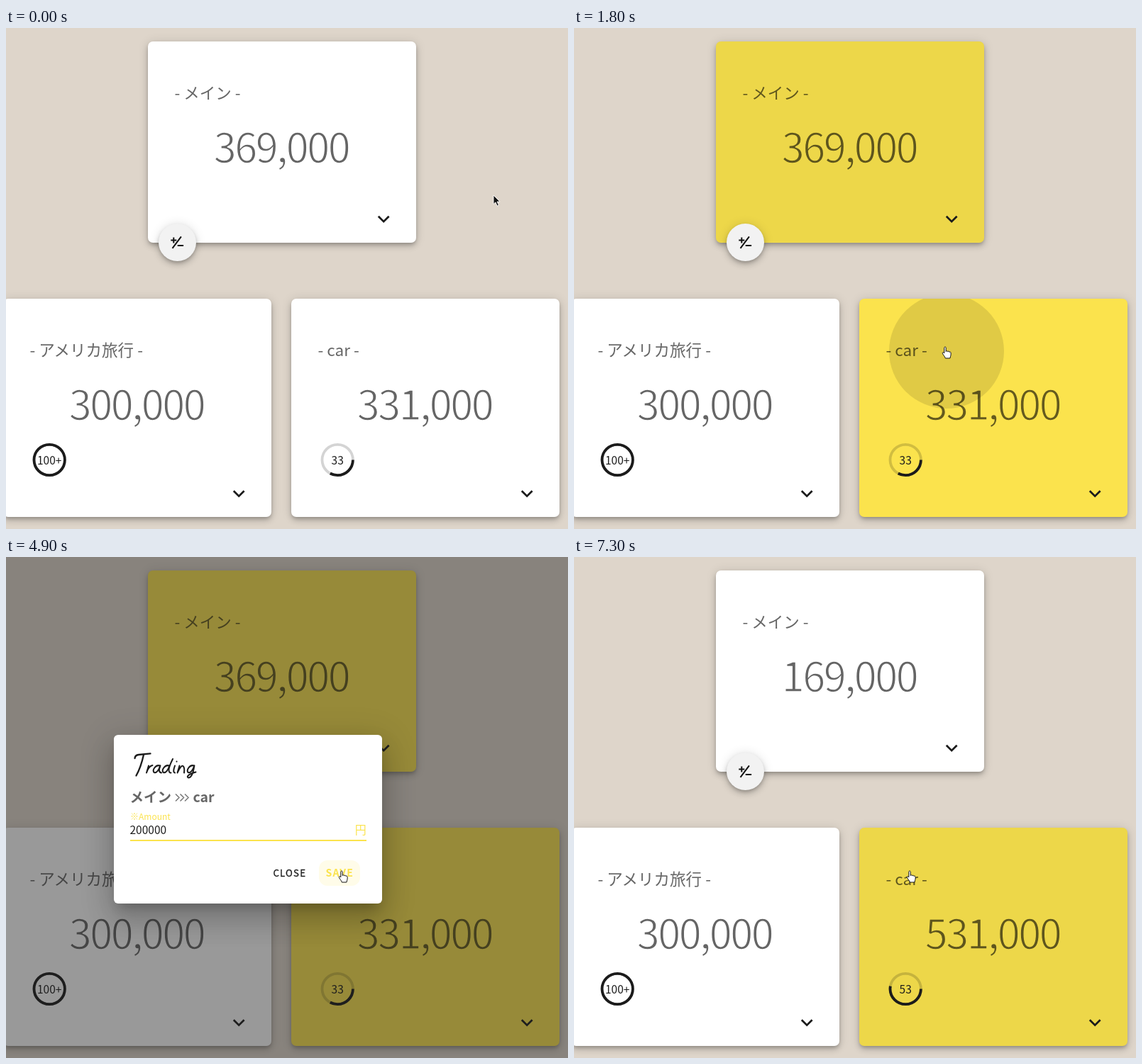
An HTML page that plays this animation: 792x707 px, repeating every 7400 ms.

```html
<!DOCTYPE html>
<html lang="ja">
<head>
<meta charset="utf-8">
<title>Trading</title>
<style>
  html, body { margin: 0; width: 100%; height: 100%; overflow: hidden; }
  body {
    position: relative; background: #ded5ca; color: #1b1b1b;
    font-family: "Noto Sans CJK JP", "Noto Sans JP", sans-serif;
  }
  .card, #fab, #shade, #dialog, #cursor { position: absolute; }
  .card { width: 378px; border-radius: 7px; overflow: hidden; }
  .card, #fab { box-shadow: 0 3px 5px -1px rgba(0,0,0,.2), 0 5px 9px rgba(0,0,0,.14), 0 1px 15px rgba(0,0,0,.12); }
  svg { display: block; width: 100%; height: 100%; }
  .name { font-size: 22.5px; fill: rgba(0,0,0,.6); }
  .sum { font-size: 57.5px; letter-spacing: -.042em; text-anchor: middle; fill: #fff; stroke: #000; stroke-width: 1.4px; }
  .pct { font-size: 15.5px; text-anchor: middle; fill: #1b1b1b; }
  #fab { left: 214.5px; top: 275.5px; width: 53px; height: 53px; border-radius: 50%; background: #f2f2f2; }
  #shade { inset: 0; background: #212121; }
  #dialog {
    left: 152px; top: 251px; width: 378px; height: 238px; border-radius: 6px; background: #fff;
    box-shadow: 0 11px 15px -7px rgba(0,0,0,.2), 0 24px 38px 3px rgba(0,0,0,.14), 0 9px 46px 8px rgba(0,0,0,.12);
  }
  .route { font-size: 19.5px; font-weight: 700; fill: #666; }
  .field { font-size: 16px; }
  .hint { font-size: 11.2px; }
  .btn { font-size: 13.2px; letter-spacing: 1.2px; stroke: #1b1b1b; stroke-width: .3px; fill: #1b1b1b; }
  .save { font-size: 14px; letter-spacing: 1.2px; font-weight: 700; }
  #cursor { left: 0; top: 0; width: 24px; height: 24px; overflow: visible; }
</style>
</head>
<body>
<div id="fab"><svg viewBox="214.5 275.5 53 53" fill="none" stroke="#111" stroke-width="2">
  <path d="M231.8 299h8M235.8 295v8M234 310.3L246.4 293.8M241.2 306.4h8.4"/>
</svg></div>
<div id="shade"></div>
<div id="dialog"><svg viewBox="152 251 378 238">
  <defs><path id="bowl" d="M9 0C3-2-2 6 .5 9.300C4 11.500 8 5 9.300 0"/></defs>
  <g fill="none" stroke="#1b1b1b" stroke-width="2" stroke-linecap="round" stroke-linejoin="round" role="img" aria-label="Trading">
    <path stroke-width="2.3" d="M181.500 284Q182 279.500 187 279T203.500 277.300M194 279Q190 297 183.500 308.500"/>
    <path d="M201 294.500L198 304.500Q201 295 206.500 294"/>
    <use href="#bowl" x="208" y="294.500"/><path d="M217.300 294.500Q214 304 219 304.500"/>
    <use href="#bowl" x="221" y="294.500"/><path d="M235 285Q229 297 229.500 301T232.500 304.500"/>
    <path d="M238 294.500Q234.500 304 238 304.500M240.500 288.500v.3"/>
    <path d="M244.500 294.500L241.500 304.500Q247 293 249.500 295T251 304.500"/>
    <use href="#bowl" x="256" y="294.500"/><path d="M265.300 294.500Q263 311.500 257 311.500C253.500 310 258 306 267.500 303.500"/>
  </g>
  <g class="route"><text class="ends" x="174.500" y="346">メイン</text><text class="ends" x="263.500" y="346">car</text></g>
  <path d="M239 334.500l5 5-5 5M245.500 334.500l5 5-5 5M252 334.500l5 5-5 5" fill="none" stroke="#777" stroke-width="1.500"/>
  <text id="label" class="field">※Amount</text>
  <text id="value" class="field" x="174.500" y="390.700" style="font-size:15.500px" fill="#1b1b1b"></text>
  <rect id="caret" y="376" width="1" height="19" fill="#fbe34d"/>
  <text id="unit" class="field" x="491.800" y="391">円</text>
  <rect id="line" x="175" width="333"/>
  <text id="hint" class="hint" x="175" y="417.600">必須項目です</text>
  <text class="btn" x="376.500" y="451">CLOSE</text>
  <rect id="halo" x="441" y="428" width="58" height="36" rx="12"/>
  <text id="save" class="save" x="450.500" y="451.200">SAVE</text>
</svg></div>
<svg id="cursor"></svg>

<script>
const LOOP = 7400, FRAME = 100, YELLOW = '#fbe34d', RED = '#c5421f';
const PICK_FROM = 1100, PICK_TO = 1800, FOCUS = 2700, TYPE = 3400, SAVE = 5300, PAID = 6000, PICK_NEXT = 6700;
const $ = id => document.getElementById(id);

const clamp = v => Math.min(1, Math.max(0, v));
const ramp = (t, start, length) => clamp((t - start) / length);
const easeOut = (t, start, length) => 1 - (1 - ramp(t, start, length)) ** 2.5;
const easeInOut = (t, start, length) => (1 - Math.cos(Math.PI * ramp(t, start, length))) / 2;
const within = (v, lo, hi) => v >= lo && v < hi;

function set(el, attrs) {
  for (const k in attrs) el.setAttribute(k, attrs[k]);
}

// The masked outline of the digits makes them thinner.
function makeCard(id, x, y, h, name, ring) {
  const el = document.createElement('div');
  el.className = 'card';
  el.style.cssText = `left:${x}px;top:${y}px;height:${h}px`;
  el.innerHTML = `<svg viewBox="0 0 378 ${h}">
    <rect class="tint" width="378" height="${h}"/>
    <circle class="ripple"/>
    <text class="name" x="37.400" y="81.300">${name}</text>
    <mask id="${id}"><text class="sum" x="188" y="170.800"></text></mask>
    <rect y="110" width="378" height="85" opacity=".6" mask="url(#${id})"/>
    ${ring ? `<g fill="none" stroke-width="3.800">
      <circle cx="65.200" cy="227.500" r="21.700" stroke="rgba(0,0,0,.17)"/>
      <circle class="arc" cx="65.200" cy="227.500" r="21.700" stroke="#1b1b1b" pathLength="100"/></g>
      <text class="pct" x="65.200" y="233.500"></text>` : ''}
    <path transform="translate(315.400 ${h - 49.8}) scale(1.400)" fill="#1b1b1b"
      d="M7.410 8.580L12 13.170l4.590-4.590L18 10l-6 6-6-6z"/>
  </svg>`;
  document.body.insertBefore(el, $('fab'));
  const part = c => el.querySelector('.' + c);
  const holds = (px, py) => within(px, x, x + 378) && within(py, y, y + h);
  return { el, x, y, holds, tint: part('tint'), ripple: part('ripple'), sum: part('sum'), arc: part('arc'), pct: part('pct') };
}

const main = makeCard('sumMain', 199.5, 19, 283.5, '- メイン -');
const trip = makeCard('sumTrip', -3.6, 382, 308, '- アメリカ旅行 -', true);
const car = makeCard('sumCar', 402, 382, 308, '- car -', true);
const cards = [main, trip, car];

// Each move eases the pointer from where it rests to a new place.
const MOVES = [
  { start: 400, length: 900, x: 459, y: 222 },
  { start: 1400, length: 300, x: 523, y: 450 },
  { start: 2200, length: 400, x: 300, y: 386 },
  { start: 4300, length: 600, x: 473, y: 443 }
];
const SHAPES = {
  arrow: '<path d="M0 0v12.500l2.900-2.600 2.300 5.200 2.200-1-2.300-5h3.900z" fill="#111" stroke="#fff" stroke-width=".9"/>',
  hand: `<path transform="translate(-4.200 0)" fill="#fff" stroke="#111" d="M3 1.500c0-2 2.400-2 2.400 0v5c.3-1.200 2.200-1
    2.400.3.500-1 2.200-.7 2.300.6.700-.7 2.200-.3 2.200 1v3c0 2-1.200 2.800-1.200 4.600H4.500C4 13.500 1.500 11.500.6 9.300c-.6-1.600 1-2.300 2.400-.4z"/>`,
  beam: '<path d="M-3-8q3 0 3 2.500Q0-8 3-8M0-6V6M-3 8q3 0 3-2.500Q0 8 3 8" fill="none" stroke="#111"/>',
  none: ''
};

function pointerAt(t) {
  const p = { x: 687, y: 236 };
  for (const m of MOVES) {
    const k = easeInOut(t, m.start, m.length);
    p.x += (m.x - p.x) * k;
    p.y += (m.y - p.y) * k;
  }
  return p;
}

function pointerShape(t, { x, y }) {
  if (within(t, TYPE, 4300)) return 'none';
  if (!within(t, 1900, SAVE + FRAME)) return cards.some(c => c.holds(x, y)) ? 'hand' : 'arrow';
  if (within(x, 175, 508) && within(y, 372, 402)) return 'beam';
  return within(x, 441, 499) && within(y, 428, 464) ? 'hand' : 'arrow';
}

function paint(card, t, { sum, yellow, hover, click = LOOP, share }) {
  const age = t - click, spot = pointerAt(click);
  card.el.style.background = yellow ? YELLOW : '#fff';
  card.sum.textContent = sum.toLocaleString('en-US');
  set(card.tint, { opacity: hover ? .055 : 0 });
  set(card.ripple, {
    cx: spot.x - card.x + 2, cy: spot.y - card.y + 6, r: 81 + 1.6 * Math.max(0, age),
    opacity: age < 0 ? 0 : (.11 + .105 * ramp(age, 0, 200)) * (1 - ramp(age, 200, 400))
  });
  if (share) {
    card.pct.textContent = share.text;
    set(card.arc, { 'stroke-dasharray': `${share.arc} ${100.01 - share.arc}` });
  }
}

function paintDialog(t) {
  const typed = within(t, TYPE + FRAME, SAVE);
  const focused = within(t, FOCUS, SAVE + FRAME);
  const tone = typed ? YELLOW : RED;
  const shown = easeOut(t, 1800, 300) * (1 - easeOut(t, SAVE, 470));
  const up = easeOut(t, FOCUS, 200) * (1 - easeOut(t, SAVE, 400));
  const box = $('dialog').style, value = $('value');
  $('shade').style.opacity = .46 * shown;
  box.opacity = shown ** .8;
  box.transform = `scale(${.5 + .5 * shown})`;
  document.querySelectorAll('.ends').forEach(e => set(e, { opacity: t > SAVE ? 0 : 1 }));

  value.textContent = typed ? '200000'.slice(0, (t - TYPE) / FRAME) : '';
  set($('label'), { fill: tone, transform: `translate(175 ${390.8 - 20.3 * up}) scale(${1 - .25 * up})` });
  set($('unit'), { fill: tone });
  set($('hint'), { fill: RED, opacity: typed ? 0 : 1 });
  set($('line'), { y: focused ? 399 : 399.5, height: focused ? 2 : 1, fill: focused ? tone : '#333' });
  set($('caret'), {
    x: 174.5 + value.getComputedTextLength(),
    opacity: focused && (within(t, TYPE, 4200) || t % 1000 < 500) ? 1 : 0
  });
  set($('save'), { fill: typed ? YELLOW : '#bdbdbd' });
  set($('halo'), { fill: typed ? YELLOW : '#000', opacity: t < 4800 ? 0 : .12 });
}

function render(t) {
  const paid = t > PAID, again = t >= PICK_NEXT;
  const trading = start => within(t, start, SAVE + FRAME);
  const grown = easeOut(t, PAID, 700);
  paint(main, t, {
    sum: paid ? 169000 : 369000, yellow: trading(PICK_FROM), hover: within(t, 900, 1900), click: PICK_FROM
  });
  paint(trip, t, { sum: 300000, share: { text: '100+', arc: 100 } });
  paint(car, t, {
    sum: paid ? 531000 : 331000, yellow: again || trading(PICK_TO), hover: t > SAVE,
    click: again ? PICK_NEXT : PICK_TO, share: { text: paid ? 53 : 33, arc: 33 + 20 * grown }
  });
  paintDialog(t);

  const p = pointerAt(t);
  $('cursor').innerHTML = SHAPES[pointerShape(t, p)];
  $('cursor').style.transform = `translate(${p.x}px, ${p.y}px)`;
}

const start = performance.now();
function tick(now) {
  const t = Math.max(0, now - start) % LOOP;
  render(Math.floor(t / FRAME) * FRAME);
  requestAnimationFrame(tick);
}
render(0);
requestAnimationFrame(tick);
</script>
</body>
</html>
```
